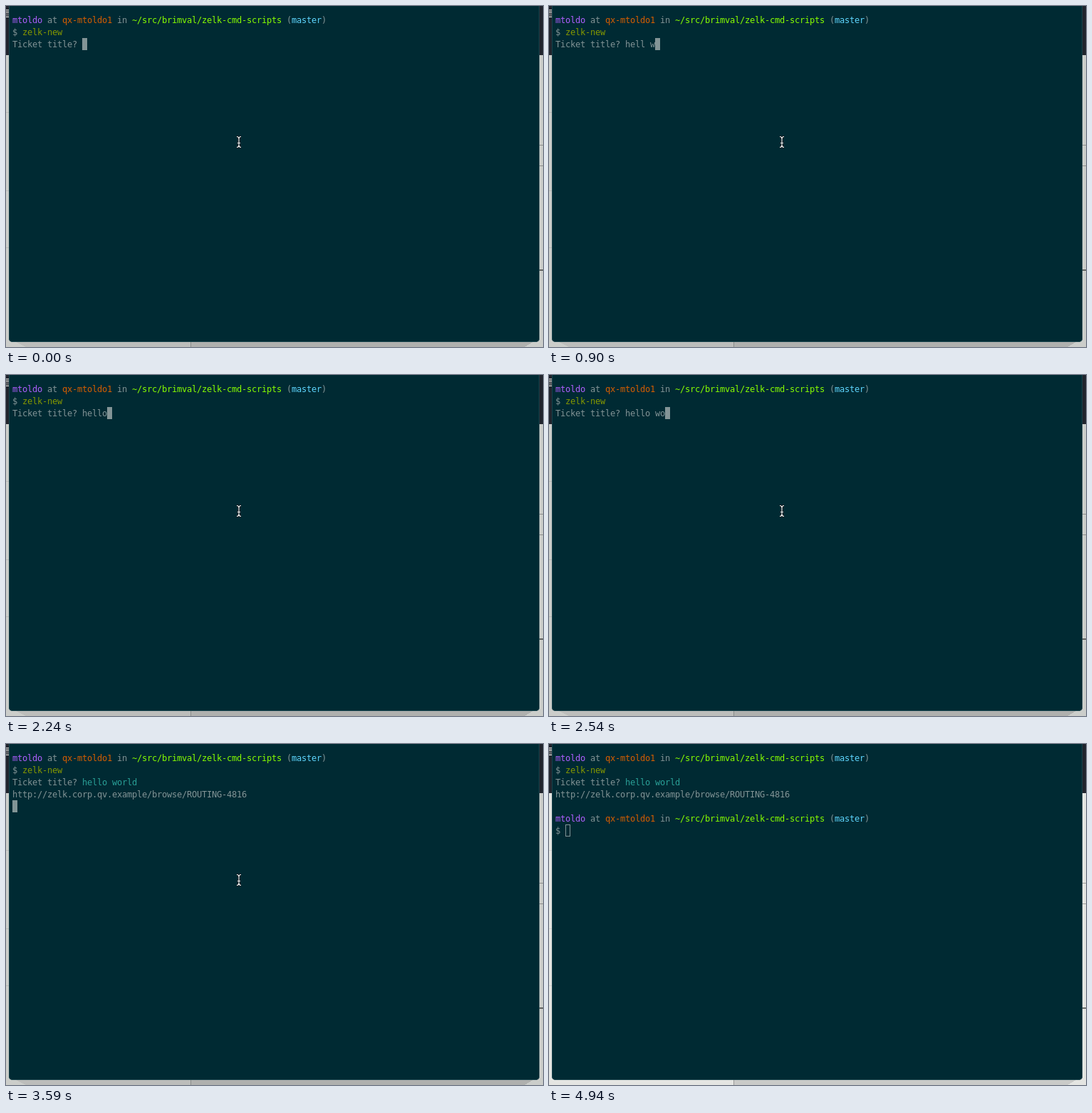
Animation of 754x479 px, one loop 5040 ms. Source, as an HTML page:

```html
<!DOCTYPE html>
<html lang="en">
<head>
<meta charset="utf-8">
<title>Ticket from the terminal</title>
<style>
  html, body { margin: 0; width: 100%; height: 100%; overflow: hidden; }
  #stage { position: relative; width: 754px; height: 479px; overflow: hidden; }
  #stage > * { position: absolute; }
  #desk, #pointer { left: 0; top: 0; }
  #desk { --page: #cbcdca; --panel: #afb0ae; --rule: #b8bab8; --line: #8a8c8a; --bar: #606260; }
  .idle #desk { --page: #e4e5e2; --panel: #c9cac8; --rule: #d3d4d2; --line: #9a9c9a; --bar: #6a6c6a; }
  .idle #shade { display: none; }
  #window {
    left: 4px; top: -8px; width: 745px; height: 480px; border-radius: 5px;
    background: #002a33; box-shadow: inset 0 0 0 1px #17424b;
  }
  .row {
    left: 9px; white-space: pre; color: #839496;
    font: 12px/14px "DejaVu Sans Mono", monospace;
    letter-spacing: calc(7px - 1ch);
    font-variant-ligatures: none;
  }
  .user { color: #af5fff; }
  .host { color: #d75f00; }
  .path { color: #87ff00; }
  .branch { color: #5fd7ff; }
  .command { color: #859900; }
  .sent #title { color: #2aa198; }
  #cursor { box-sizing: border-box; width: 7px; height: 17px; border: 1px solid #839496; background: #839496; }
  .idle #cursor { background: none; }
</style>
</head>
<body>
<div id="stage">
  <svg id="desk" width="754" height="479" shape-rendering="crispEdges">
    <rect width="754" height="479" fill="var(--page)"/>
    <rect width="754" height="69" fill="#20242d"/>
    <rect y="5" width="4" height="11" fill="#5b5d62"/>
    <path d="M0 5.5h4M0 8.5h4M0 15.5h4" stroke="var(--page)"/>
    <path d="M0 149.5h4M0 259.5h4M0 339.5h4" stroke="var(--rule)"/>
    <path d="M749 195.5h5M749 224.5h5" stroke="var(--line)"/>
    <path d="M749 371h5" stroke="var(--bar)" stroke-width="2"/>
    <path id="shade" d="M14 472H740L728 479H28Z" fill="#bcbdbb"/>
    <path d="M260 472H740L728 479H260Z" fill="var(--panel)"/>
    <path d="M259.5 472v7" stroke="var(--line)"/>
  </svg>
  <div id="window"></div>
  <div id="cursor"></div>
  <svg id="pointer" width="754" height="479" fill="none">
    <defs>
      <path id="beam" d="M324 183.5q3 0 3 3v9q0 3-3 3M330 183.5q-3 0-3 3v9q0 3 3 3M325 192.5h4"/>
    </defs>
    <use href="#beam" stroke="#0b1519" stroke-width="2.4"/>
    <use href="#beam" stroke="#fff" stroke-width="1.1"/>
  </svg>
</div>
<script>
  const LOOP = 5040;
  const SENT = 2990, LINKED = 3590, READY = 3740, MOVED = 4190, HIDDEN = 4340, IDLE = 4940;
  const CELL = { x: 9, y: 11, width: 7, height: 17 };
  const QUESTION = 'Ticket title? ';
  const TYPING = [
    [0, ''], [300, 'h'], [450, 'hel'], [600, 'hell'], [750, 'hell '], [900, 'hell w'],
    [1190, 'hell '], [1340, 'hell'], [1490, 'hel'], [1640, 'helo'], [1940, 'hel'],
    [2240, 'hello'], [2390, 'hello '], [2540, 'hello wo'], [2690, 'hello worl'],
    [2840, 'hello world']
  ];
  const PROMPT = '<span class="user">mtoldo</span> at <span class="host">qx-mtoldo1</span> in ' +
    '<span class="path">~/src/brimval/zelk-cmd-scripts</span> (<span class="branch">master</span>)';

  const stage = document.getElementById('stage');
  const cursor = document.getElementById('cursor');
  const pointer = document.getElementById('pointer');

  function addRow(line, html) {
    const row = document.createElement('div');
    row.className = 'row';
    row.style.top = CELL.y + line * CELL.height + 2 + 'px';
    row.innerHTML = html;
    stage.insertBefore(row, cursor);
    return row;
  }

  addRow(0, PROMPT);
  addRow(1, '$ <span class="command">zelk-new</span>');
  addRow(2, QUESTION + '<span id="title"></span>');
  const link = addRow(3, 'http://zelk.corp.qv.example/browse/ROUTING-4816');
  const nextPrompt = [addRow(5, PROMPT), addRow(6, '$ ')];
  const title = document.getElementById('title');

  const show = (element, visible) => { element.style.visibility = visible ? 'visible' : 'hidden'; };

  function cursorCell(time, typed) {
    if (time < SENT) return [QUESTION.length + typed.length, 2];
    if (time < LINKED) return [0, 3];
    if (time < READY) return [0, 4];
    return [2, 6];
  }

  function draw(time) {
    const typed = TYPING.filter(([start]) => start <= time).pop()[1];
    if (title.textContent !== typed) title.textContent = typed;
    stage.classList.toggle('sent', time >= SENT);
    stage.classList.toggle('idle', time >= IDLE);
    show(link, time >= LINKED);
    nextPrompt.forEach(row => show(row, time >= READY));

    const [column, line] = cursorCell(time, typed);
    cursor.style.left = CELL.x + column * CELL.width + 'px';
    cursor.style.top = CELL.y + line * CELL.height + 'px';

    pointer.style.transform = time >= MOVED ? 'translate(272px, 209px)' : 'none';
    show(pointer, time < HIDDEN);
  }

  const origin = performance.now();
  function tick() {
    draw((performance.now() - origin) % LOOP);
    requestAnimationFrame(tick);
  }
  tick();
</script>
</body>
</html>
```
